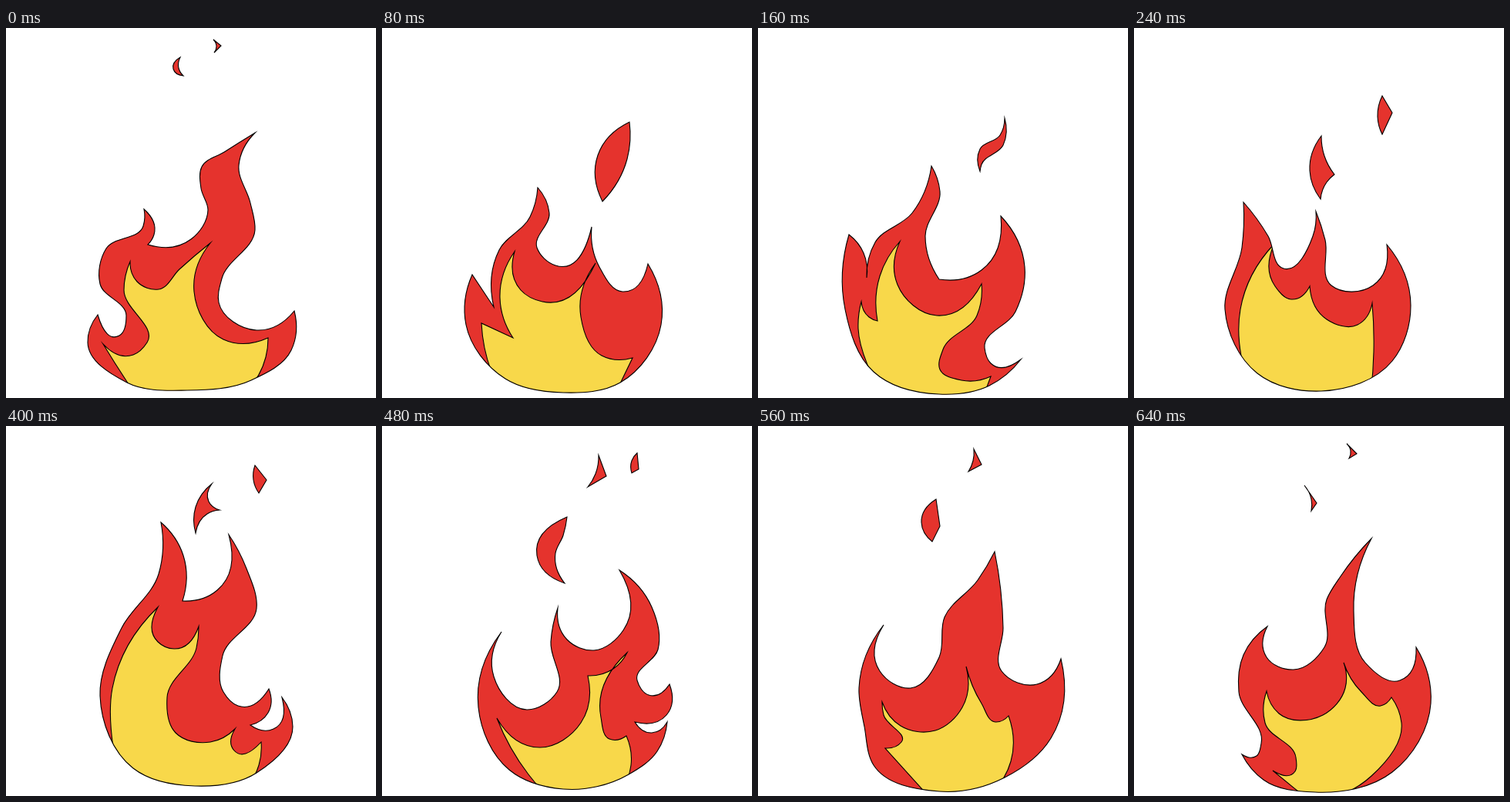
These frames come from a looping animation (480x480 px, 720 ms). An HTML page with a canvas:

```html
<!DOCTYPE html>
<html lang="en">
<head>
<meta charset="utf-8">
<title>Flame</title>
<style>
html, body { margin: 0; width: 100%; height: 100%; overflow: hidden; background: #fff; }
canvas { display: block; width: 480px; height: 480px; }
</style>
</head>
<body>
<canvas id="stage" width="480" height="480"></canvas>
<script>
const RED = '#e5332d', YELLOW = '#f8d84a', HOLD = 80;
const ctx = document.getElementById('stage').getContext('2d');
const poses = [];

function readPoints(run) {
  const n = (run.match(/\d+/g) || []).map(Number);
  return n.flatMap((x, i) => i % 2 ? [] : [[x, n[i + 1]]]);
}

// Unit tangent at b on a smooth line a-b-c
function tangent(a, b, c) {
  const u = [b[0] - a[0], b[1] - a[1]], v = [c[0] - b[0], c[1] - b[1]];
  const lu = u[0] ** 2 + u[1] ** 2, lv = v[0] ** 2 + v[1] ** 2;
  const x = u[0] / lu + v[0] / lv, y = u[1] / lu + v[1] / lv, len = Math.hypot(x, y) || 1;
  return [x / len, y / len];
}

const along = (p, t, d) => [p[0] + t[0] * d, p[1] + t[1] * d];

// Closed outline through "x y x y ..."; a slash marks a sharp corner
function outline(path, text) {
  const runs = text.split('/').map(readPoints), first = runs[0][0];
  runs[runs.length - 1].push(first);
  path.moveTo(...first);
  let last = null;
  for (const run of runs) {
    const p = last ? [last, ...run] : run;
    for (let i = 1; i < p.length; i++) {
      const a = p[i - 1], b = p[i], len = Math.hypot(b[0] - a[0], b[1] - a[1]);
      const ta = i > 1 && tangent(p[i - 2], a, b);
      const tb = i < p.length - 1 && tangent(a, b, p[i + 1]);
      if (ta && tb) path.bezierCurveTo(...along(a, ta, len / 3), ...along(b, tb, -len / 3), ...b);
      else if (ta) path.quadraticCurveTo(...along(a, ta, len / 2), ...b);
      else if (tb) path.quadraticCurveTo(...along(b, tb, -len / 2), ...b);
      else path.lineTo(...b);
    }
    last = p[p.length - 1];
  }
  path.closePath();
}

function pose(core, body, ...sparks) {
  const yellow = new Path2D(), red = new Path2D();
  outline(yellow, core);
  [body, ...sparks].forEach(s => outline(red, s));
  poses.push({ yellow, red });
}

pose('178 490 157 459 126 410/165 424 183 408 153 340 161 303/170 329 198 339 225 313 265 279/244 342 282 404 340 402/337 427 300 482/',
  '323 136/283 161 254 180 253 208 262 236 240 274 184 281/192 268 179 235/178 257 130 286 122 332 156 373 147 399 119 372/106 408 157 460 235 470 318 457 370 418 374 367/325 392 276 356 280 325 323 262 317 227 302 178',
  '226 38/217 53 230 62/224 52', '269 15/279 23/270 32/273 24');

pose('165 490 133 415 129 383/170 402/153 350 172 290/180 340 208 355 277 305/258 375 285 425 325 428/295 490/',
  '202 207/217 240 201 285 225 308 272 258/282 310 312 342 345 306/362 385 309 460 235 473 160 455 109 385 117 320/145 362/152 288 192 245',
  '321 122/318 170 286 225/280 165');

pose('175 490 142 437 130 390 134 355/144 375 155 380/158 322 184 277/181 333 232 373 290 332/284 373 240 417 236 443 264 457 302 452/290 484/',
  '225 179/236 212 217 270 235 326/290 314 315 244/346 310 334 368 294 415 302 435 341 430/300 464 235 475 150 446 113 365 118 268/137 292 141 324/152 278 200 240',
  '320 117/318 152 290 177 288 186/288 157 314 139');

pose('165 490 139 425 138 365 182 280/183 335 204 352 228 335/250 378 290 385 309 357/311 420 305 490/',
  '142 226/174 270 194 312 232 270 236 238/248 275 256 334 310 334 328 281/359 360 335 432 243 471 160 448 118 365 140 285',
  '243 140/247 166 260 190/250 200 242 222/228 185', '322 88/335 110/322 138/316 115');

pose('150 480 134 406 146 353 181 282/182 335 204 349 231 321/238 372 285 405 327 381/329 430 324 484/',
  '166 185/203 208 210 228 204 283 217 304 248 277 252 236/269 258 255 310 285 351 331 363 341 318/371 390 325 448 250 467 165 446 123 370 140 302 174 245',
  '261 117/260 148 283 176/268 182 262 203/245 160', '322 63/343 82/332 96/330 80');

pose('155 480 139 417 138 340 197 235/197 280 218 289 250 260/247 288 209 352 220 398 265 410 297 393/296 421 331 410/328 440 295 484/',
  '201 125/230 168 229 227/274 213 289 141/312 185 325 237 281 298 282 345 301 363 341 341/340 372 317 388/347 393 358 352/372 390 325 450 245 467 165 444 122 350 150 262 198 192',
  '267 75/263 98 277 109/261 114 246 139/246 105', '323 51/338 70/328 87/321 70');

pose('225 490 190 452 149 379/205 417 258 385 267 324/300 315 318 294/284 378 295 406 317 402/323 440 300 484/',
  '155 267/145 325 188 368 227 345 219 280 228 236/240 277 275 291 313 265 308 187/350 235 358 290 331 330 346 349 373 335/369 375 328 384/350 398 370 384/357 422 320 452 235 471 165 446 125 365',
  '240 118/201 168 237 204/225 165 235 142', '281 38/291 65/267 79/277 62', '331 35/333 56/324 61/324 45');

pose('230 490 165 418/186 410 163 375 161 358/185 389 230 395 265 365 270 312/290 360 308 384 325 376/328 435 285 490/',
  '163 258/158 318 198 340 235 300 242 248 285 200 307 163/318 262 316 318 362 335 393 302/380 405 320 456 235 474 150 440 138 390 131 340',
  '231 95/236 130/226 150/212 125', '280 30/290 50/273 59/279 45');

pose('245 500 213 474 180 447/209 448 210 430 170 385 172 344/188 373 245 375 274 340 272 307/295 345 320 363 334 352/347 385 308 454 265 480/',
  '308 146/285 240 300 307 345 330 366 287/385 360 335 449 235 475 168 459 140 426/159 428 165 412 136 345 142 297 173 260/172 300 207 316 247 287 250 225 268 195',
  '221 77/237 100/230 110/230 95', '276 23/289 36/279 42/281 32');

function paint(time) {
  const { yellow, red } = poses[Math.floor(time / HOLD) % poses.length];
  ctx.fillStyle = '#fff';
  ctx.fillRect(0, 0, 480, 480);
  ctx.lineWidth = 1.1;
  ctx.fillStyle = RED;
  ctx.fill(red);
  ctx.save();
  ctx.clip(red);
  ctx.fillStyle = YELLOW;
  ctx.fill(yellow);
  ctx.stroke(yellow);
  ctx.restore();
  ctx.stroke(red);
}

const start = performance.now();
function tick() {
  paint(performance.now() - start);
  requestAnimationFrame(tick);
}
tick();
</script>
</body>
</html>
```
